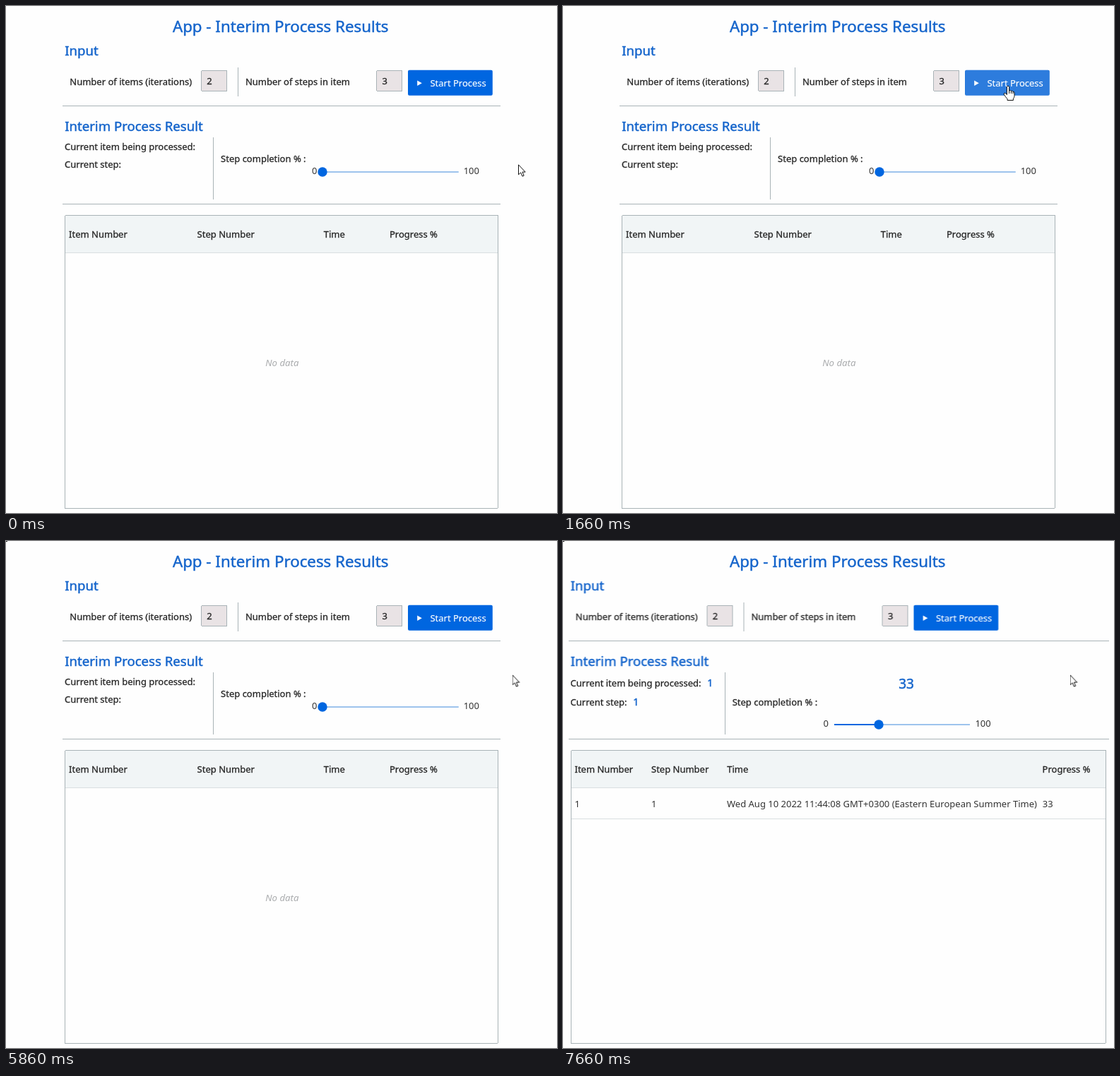
Animation of 780 by 718 pixels, one loop 8 s. Source, as an HTML page:

```html
<!DOCTYPE html>
<html lang="en">
<head>
<meta charset="utf-8">
<title>Interim Process Results</title>
<style>
html, body { margin: 0; width: 100%; height: 100%; overflow: hidden; background: #fefefe; }
svg { display: block; width: 780px; height: 718px; }
text { font: 13px "Noto Sans", "Open Sans", sans-serif; fill: #333; white-space: pre; }
rect { shape-rendering: crispEdges; }
.label { font-weight: 500; fill: #262626; stroke: #262626; stroke-width: .3px; }
.title, .head, .value { font-weight: 500; fill: #1464cb; stroke: #1464cb; stroke-width: .45px; }
.title { font-size: 22.3px; text-anchor: middle; }
.head { font-size: 18.6px; }
.value { font-size: 14px; }
.big { font-size: 19px; }
.on-blue { fill: #fff; stroke: #fff; stroke-width: .15px; }
.empty { font-size: 13.2px; font-style: italic; fill: #a9abad; text-anchor: middle; }
.rule, .frame { fill: #a9b3b7; }
.rule.soft { fill: #d9dfe1; }
.paper { fill: #fefefe; }
.band { fill: #f1f5f6; }
.field { fill: #e9e3e5; }
.track { fill: #8dbaea; shape-rendering: auto; }
.blue { fill: #0066e0; shape-rendering: auto; }

.shift, .narrow, .wide, .before, .after, .arrow, .hand, .button, .speck { animation: 8s step-end infinite; }
.shift { animation-name: shift; }
.narrow { animation-name: narrow; }
.wide { animation-name: wide; }
.before { animation-name: before; }
.after { animation-name: after; }
.arrow { animation-name: arrow; }
.hand { animation-name: hand; }
.button { animation-name: hover; shape-rendering: auto; }
.speck { animation-name: speck; }
.cursor { animation: travel 8s linear infinite; }
.ripple { transform-origin: 556px 111px; animation: ripple 8s linear infinite; }
.thumb { animation: thumb 8s linear infinite; }
.fill { transform-origin: 384px 260px; animation: fill 8s linear infinite; }

@keyframes shift { 0% { transform: translateX(72.5px); } 80%, 100% { transform: none; } }
@keyframes narrow { 0% { opacity: 1; } 80%, 100% { opacity: 0; } }
@keyframes wide { 0% { opacity: 0; } 80%, 100% { opacity: 1; } }
@keyframes before { 0% { opacity: 1; } 80.75%, 100% { opacity: 0; } }
@keyframes after { 0% { opacity: 0; } 80.75%, 100% { opacity: 1; } }
@keyframes arrow { 0% { opacity: 1; } 8.4% { opacity: 0; } 25%, 100% { opacity: 1; } }
@keyframes hand { 0% { opacity: 0; } 8.4% { opacity: 1; } 25%, 100% { opacity: 0; } }
@keyframes hover { 0% { fill: #0066e0; } 8.4% { fill: #0061d6; } 25%, 100% { fill: #0066e0; } }
@keyframes speck { 0% { opacity: 0; } 22.5%, 100% { opacity: 1; } }
@keyframes travel {
  0%, .75% { transform: translate(725px, 224px); animation-timing-function: ease-in-out; }
  10.75%, 22.5% { transform: translate(630px, 113px); animation-timing-function: ease-in-out; }
  30.75%, 45% { transform: translate(713px, 189px); }
  45.75%, 95% { transform: translate(716.5px, 189px); }
  95.75%, 100% { transform: translate(717.5px, 189px); }
}
@keyframes ripple {
  0%, 13.5% { transform: scale(0); opacity: .18; animation-timing-function: cubic-bezier(0, 0, .2, 1); }
  19.1%, 22.5% { transform: scale(1); opacity: .18; }
  28.75%, 100% { transform: scale(1); opacity: 0; }
}
@keyframes thumb {
  0%, 80.75% { transform: none; animation-timing-function: cubic-bezier(.25, .8, .25, 1); }
  86.25%, 100% { transform: translateX(63px); }
}
@keyframes fill {
  0%, 80.75% { transform: scaleX(0); animation-timing-function: cubic-bezier(.25, .8, .25, 1); }
  86.25%, 100% { transform: none; }
}
</style>
</head>
<body>
<svg viewBox="0 0 780 718">
  <defs>
    <clipPath id="button-area"><rect x="496.5" y="90.8" width="119.8" height="36" rx="2"/></clipPath>
  </defs>

  <rect class="speck" width="2" height="1" fill="#222"/>
  <text class="title" x="388.7" y="37">App - Interim Process Results</text>

  <g class="narrow">
    <rect class="rule" x="80" y="141" width="620" height="1"/>
    <rect class="rule" x="80" y="280" width="620" height="1"/>
    <rect class="frame" x="83" y="296" width="614" height="416" rx="2"/>
    <rect class="paper" x="84" y="297" width="612" height="414" rx="1"/>
    <rect class="band" x="84" y="297" width="612" height="52"/>
    <rect class="rule soft" x="84" y="349" width="612" height="1"/>
    <text class="label" x="89.1" y="327.7">Item Number</text>
    <text class="label" x="270.6" y="327.7">Step Number</text>
    <text class="label" x="449.7" y="327.7">Time</text>
    <text class="label" x="543" y="327.7">Progress %</text>
    <text class="empty" x="390.8" y="510">No data</text>
  </g>

  <g class="wide">
    <rect class="rule" x="8" y="141" width="765" height="1"/>
    <rect class="rule" x="8" y="280" width="765" height="1"/>
    <rect class="frame" x="11" y="296" width="758" height="416" rx="2"/>
    <rect class="paper" x="12" y="297" width="756" height="414" rx="1"/>
    <rect class="band" x="12" y="297" width="756" height="52"/>
    <rect class="rule soft" x="12" y="349" width="756" height="1"/>
    <rect class="rule soft" x="12" y="393" width="756" height="1"/>
    <text class="label" x="16.5" y="327.7">Item Number</text>
    <text class="label" x="125" y="327.7">Step Number</text>
    <text class="label" x="232.2" y="327.7">Time</text>
    <text class="label" x="678.6" y="327.7">Progress %</text>
    <text x="16.5" y="376.7">1</text>
    <text x="124.9" y="376.7">1</text>
    <text x="232" y="376.7">Wed Aug 10 2022 11:44:08 GMT+0300 (Eastern European Summer Time)</text>
    <text x="678.8" y="376.7">33</text>
  </g>

  <g class="shift">
    <text class="head" x="10.7" y="70.3">Input</text>
    <text class="label" x="17.8" y="112">Number of items (iterations)</text>
    <rect class="frame" x="203.75" y="91" width="37" height="30" rx="2"/>
    <rect class="field" x="204.75" y="92" width="35" height="28" rx="1"/>
    <text class="label" x="211.8" y="111">2</text>
    <rect class="rule" x="255.75" y="87" width="1" height="41"/>
    <text class="label" x="266.4" y="112">Number of steps in item</text>
    <rect class="frame" x="451.75" y="91" width="37" height="30" rx="2"/>
    <rect class="field" x="452.75" y="92" width="35" height="28" rx="1"/>
    <text class="label" x="459.9" y="111">3</text>
    <rect class="button" x="496.5" y="90.8" width="119.8" height="36" rx="2"/>
    <g clip-path="url(#button-area)">
      <circle class="ripple" cx="556" cy="111" r="63" fill="#fff"/>
    </g>
    <path d="M509.7 105.5v7.6l6.6-3.8z" fill="#fff"/>
    <text class="on-blue" x="527.9" y="114">Start Process</text>
    <text class="head" x="10.7" y="176.9">Interim Process Result</text>

    <g class="before">
      <text class="label" x="10.6" y="203.7">Current item being processed:</text>
      <text class="label" x="10.6" y="228.7">Current step:</text>
      <rect class="rule" x="220.75" y="186" width="1" height="88"/>
      <text class="label" x="231.6" y="221">Step completion % :</text>
      <text x="360.4" y="238">0</text>
      <rect class="track" x="375.75" y="234.2" width="192.5" height="1.7"/>
      <circle class="blue" cx="375.5" cy="235" r="6.7"/>
      <text x="575.2" y="238">100</text>
    </g>
  </g>

  <g class="after">
    <text class="label" x="10.6" y="205.5">Current item being processed:</text>
    <text class="value" x="204.2" y="205.5">1</text>
    <text class="label" x="10.6" y="233">Current step:</text>
    <text class="value" x="99.2" y="233">1</text>
    <rect class="rule" x="229" y="186" width="1" height="88"/>
    <text class="value big" x="475.2" y="209.3">33</text>
    <text class="label" x="239.7" y="233">Step completion % :</text>
    <text x="368.5" y="263">0</text>
    <rect class="track" x="384" y="259.2" width="192" height="1.7"/>
    <rect class="blue fill" x="384" y="259" width="63" height="2"/>
    <circle class="blue thumb" cx="384" cy="260" r="6.7"/>
    <text x="583.4" y="263">100</text>
  </g>

  <g class="cursor" fill="#fff" stroke="#111" stroke-linejoin="round">
    <path class="arrow" d="M.5 .8V14.8L3.7 11.9L6 17.2L8.2 16.2L6 11.1H10.2Z"/>
    <g class="hand">
      <path d="M-1.6 12.5V1.8Q-1.4 .3 0 .3T1.6 1.8V7Q3.6 5.9 4.4 7.4Q6.1 6.6 6.8 8.2Q9 7.7 9 10V14.5Q9 16.5 7.4 18.2V20.5H-1V18.5Q-3.4 16.2-5.8 12.2Q-6.2 10.2-4.3 10.3Q-3 10.9-1.6 12.5Z"/>
      <path d="M1.6 6.8V11M4.4 7.6V11M6.9 8.4V11.2" fill="none"/>
    </g>
  </g>
</svg>
</body>
</html>
```
